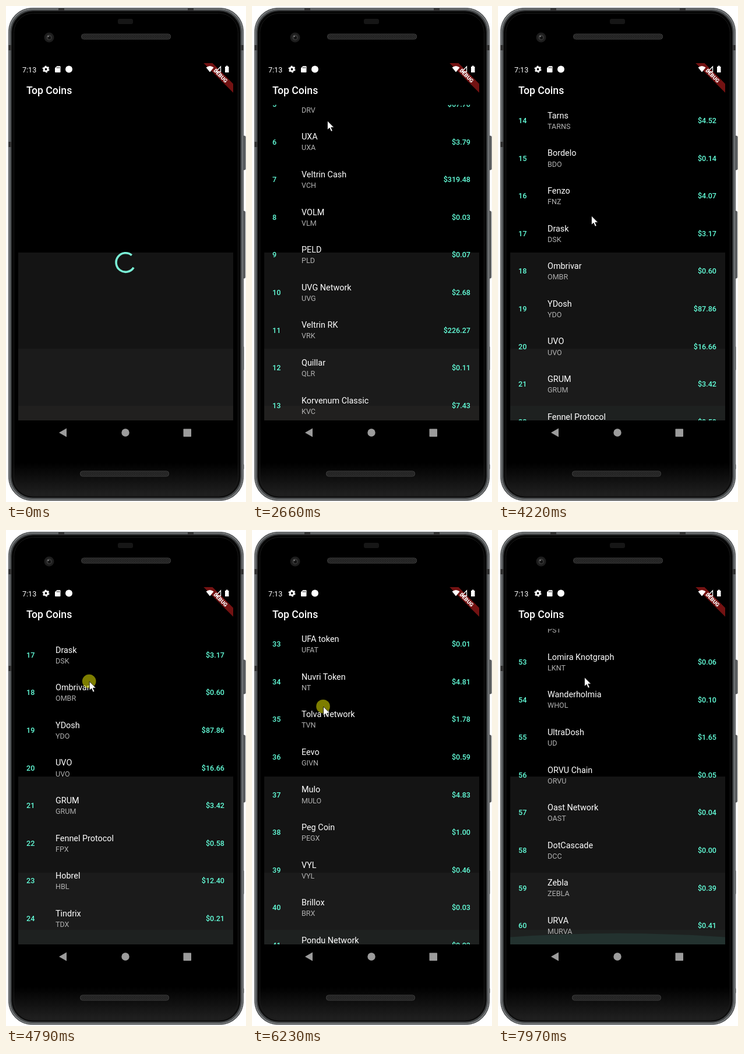
Recreate the animation shown at these times as an HTML page. Size 412 px wide and 851 px high, loop 8 s.

```html
<!DOCTYPE html>
<html lang="en">
<head>
<meta charset="utf-8">
<title>Top Coins</title>
<style>
  html, body { margin: 0; width: 100%; height: 100%; overflow: hidden; background: #fff; }
  svg { display: block; width: 412px; height: 851px; font-family: Roboto, "Liberation Sans", sans-serif; }
  .title { font-size: 14.4px; fill: #fff; }
  .sym { font-size: 12.57px; fill: #b0b0b0; }
  .num { font-size: 12.57px; font-weight: 500; fill: #64ffda; }
  .end { text-anchor: end; }
</style>
</head>
<body>
<svg viewBox="0 0 412 851">
  <defs>
    <clipPath id="listClip"><rect x="21" y="169.5" width="369" height="541.5"/></clipPath>
    <clipPath id="screenClip"><rect x="21" y="98" width="369" height="613"/></clipPath>
    <linearGradient id="chin" x2="0" y2="1">
      <stop offset="0" stop-color="#000"/><stop offset=".93" stop-color="#000"/>
      <stop offset="1" stop-color="#222"/>
    </linearGradient>
    <pattern id="mesh" width="3" height="3" patternUnits="userSpaceOnUse">
      <rect width="3" height="3" fill="#161616"/>
      <path d="M0 0L3 3M3 0L0 3" stroke="#3c3c3c" stroke-width=".7"/>
    </pattern>
  </defs>

  <!-- phone body -->
  <g fill="#5c5f61" stroke="#333" stroke-width=".8">
    <rect x="404" y="223" width="7" height="58" rx="1.5"/>
    <rect x="404" y="352" width="6.500" height="115" rx="1.5"/>
    <rect x="404" y="584" width="4" height="41" rx="1"/>
    <rect x="404" y="786" width="4" height="9" rx="1"/>
  </g>
  <rect x="4.500" y="3.500" width="403" height="845" rx="40" fill="#2e3031" stroke="#55585a"/>
  <rect x="6.250" y="5.250" width="399.500" height="841.500" rx="38.500" fill="none" stroke="#7c7f81" stroke-width="2"/>
  <rect x="8.250" y="7.250" width="395.500" height="837.500" rx="37" fill="none" stroke="#4b4e50" stroke-width="2"/>
  <g fill="#333">
    <rect x="4" y="67" width="6" height="9"/><rect x="402" y="67" width="6" height="9"/>
    <rect x="4" y="233" width="6" height="9"/>
    <rect x="90" y="4" width="10" height="4"/><rect x="312" y="4" width="10" height="4"/>
  </g>
  <rect x="10.500" y="9.500" width="391" height="833" rx="36" fill="url(#chin)" stroke="#0c0c0c" stroke-width="2"/>
  <rect x="13.500" y="12.500" width="385" height="827" rx="33" fill="none" stroke="#1c1c1c"/>
  <rect x="192" y="22" width="26" height="9" rx="3" fill="#161616"/>
  <rect x="129.500" y="48" width="153" height="9" rx="4" fill="url(#mesh)" stroke="#3a3a3a"/>
  <rect x="127.500" y="798" width="152" height="9" rx="4" fill="url(#mesh)" stroke="#3a3a3a"/>
  <circle cx="74" cy="54" r="8.500" fill="#1d1d1d"/>
  <circle cx="74" cy="54" r="5" fill="#333"/>
  <circle cx="74.500" cy="54.500" r="2.500" fill="#111"/>
  <circle cx="72.500" cy="52" r="1.200" fill="#888"/>

  <!-- screen -->
  <rect x="21" y="98" width="369" height="664" fill="#000"/>
  <rect x="21" y="423" width="369" height="165" fill="#141414"/>
  <rect x="21" y="588" width="369" height="98" fill="#1b1b1b"/>
  <rect id="band" x="21" y="686" width="369" height="25" fill="#21201f"/>
  <g clip-path="url(#listClip)">
    <g id="list"></g>
    <path id="glow" fill="#64ffda" fill-opacity=".075"/>
  </g>
  <path id="spinner" fill="none" stroke="#7af0d6" stroke-width="3.600"/>
  <text x="35" y="151" font-size="17.650" font-weight="500" fill="#fff">Top Coins</text>

  <!-- banner and status bar -->
  <g clip-path="url(#screenClip)">
    <g transform="translate(390 98) rotate(45)">
      <rect x="-40" y="25.100" width="80" height="10.800" fill="#731212"/>
      <text y="33.800" font-size="9.160" font-weight="900" fill="#fff" text-anchor="middle">DEBUG</text>
    </g>
  </g>
  <text x="28" y="113.500" font-size="12.570" fill="#fff">7:13</text>
  <g fill="#fff">
    <circle cx="68.500" cy="108.500" r="3.300" fill="none" stroke="#fff" stroke-width="2.800"/>
    <circle cx="68.500" cy="108.500" r="5.100" fill="none" stroke="#fff" stroke-width="1.800" stroke-dasharray="2.900 2.440"/>
    <path d="M87.500 103H92.500Q93.500 103 93.500 104V113Q93.500 114 92.500 114H85Q84 114 84 113V106.500Z"/>
    <path d="M87.500 104.500v2.500M89.500 104.500v2.500M91.500 104.500v2.500" stroke="#000" stroke-width=".8"/>
    <circle cx="108" cy="108.500" r="6"/>
    <path d="M343.500 105.500Q350 100.500 356.500 105.500L350 113.500Z"/>
    <path d="M360 113L368.500 104V113Z" fill="none" stroke="#fff" stroke-width="1.300"/>
    <path d="M376 104H377.800V102.500H380.700V104H382.500V114H376Z"/>
  </g>

  <!-- navigation bar -->
  <g fill="#9c9c9c">
    <path d="M91 732L104 724.500V739.500Z"/>
    <circle cx="205" cy="732" r="6.700"/>
    <rect x="304.500" y="725.500" width="13.500" height="13.500" rx=".8"/>
  </g>

  <g id="pointer">
    <circle id="touch" cy=".5" r="11.800" fill="#ff0" fill-opacity=".49"/>
    <path id="cursor" transform="translate(.5 .8)" d="M0 0V15.500L3.600 12.200L6.200 18.300L8.800 17.200L6.200 11.300H11.200Z" fill="#fff" stroke="#000" stroke-width=".8"/>
  </g>
</svg>
<script>
const COINS = `Veltrin|VLT|11842.30
Korvenum|KVN|392.14
Stabrel|SBR|1.00
QVP|QVP|0.25
Drovacoin|DRV|67.70
UXA|UXA|3.79
Veltrin Cash|VCH|319.48
VOLM|VLM|0.03
PELD|PLD|0.07
UVG Network|UVG|2.68
Veltrin RK|VRK|226.27
Quillar|QLR|0.11
Korvenum Classic|KVC|7.43
Tarns|TARNS|4.52
Bordelo|BDO|0.14
Fenzo|FNZ|4.07
Drask|DSK|3.17
Ombrivar|OMBR|0.60
YDosh|YDO|87.86
UVO|UVO|16.66
GRUM|GRUM|3.42
Fennel Protocol|FPX|0.58
Hobrel|HBL|12.40
Tindrix|TDX|0.21
Palvo|PLV|2.36
Marrowcoin|MRW|71.05
Creel Network|CRLN|0.09
Jostle|JSL|5.12
Ravunde|RVD|0.33
Plain Notice Token|PNT|0.24
9q|QRN|0.56
Brintelovo Chain Token|CVO|0.17
UFA token|UFAT|0.01
Nuvri Token|NT|4.81
Tolva Network|TVN|1.78
Eevo|GIVN|0.59
Mulo|MULO|4.83
Peg Coin|PEGX|1.00
VYL|VYL|0.46
Brillox|BRX|0.03
Pondu Network|PONDU|0.03
Yelt Network|YELT|0.01
Mothcoin|MOTH|0.00
Tavelo|TVO|93.98
Urzy|URB|5.93
Brocadel|BRCD|187.65
Glomeriq|GMQ|6.17
Bevel DAO Token|BVL|4.30
Sundrel|SDL|0.72
Crestovar|CVR|1.14
Wexel Chain|WXL|0.08
Postrel|PST|0.15
Lomira Knotgraph|LKNT|0.06
Wanderholmia|WHOL|0.10
UltraDosh|UD|1.65
ORVU Chain|ORVU|0.05
Oast Network|OAST|0.04
DotCascade|DCC|0.00
Zebla|ZEBLA|0.39
URVA|MURVA|0.41`.split("\n").map(line => line.split("|"));

const LOOP = 8000, LOADED = 570, ROW = 64.6, FIRST = 202, SLOP = 16;
const MAX_SCROLL = COINS.length * ROW - 541.3;
const $ = id => document.getElementById(id);
const clamp = (v, lo = 0, hi = 1) => Math.min(hi, Math.max(lo, v));

// Pointer path: time, x, y
const PATH = [
  [1750, 291, 822], [1900, 186, 396], [2450, 186, 396], [2570, 133, 194],
  [2660, 129, 196], [2800, 134, 225], [3270, 159, 422], [3440, 160, 423],
  [3760, 160, 423], [3900, 145, 255], [3980, 143, 245], [4220, 160, 359],
  [4520, 158, 420], [4700, 156, 420], [4830, 137, 190], [4960, 133, 182],
  [5440, 133, 380], [5800, 122, 377], [6130, 122, 377], [6230, 122, 304],
  [6300, 126, 178], [6420, 130, 172], [6860, 146, 400], [6960, 146, 400],
  [7200, 148, 422], [7330, 148, 423], [7470, 150, 158], [7560, 149, 152],
  [7790, 149, 152], [7970, 148, 252]
];

// Flings: press, release, coast time, coast distance
const FLINGS = [
  [2270, 2570, 710, 310], [3650, 3900, 650, 231], [4640, 4830, 1140, 929],
  [6100, 6300, 560, 380.5], [7280, 7470, 1170, 950]
];

function pointer(t) {
  const i = PATH.findIndex(k => k[0] > t);
  if (i < 1) return (i ? PATH[PATH.length - 1] : PATH[0]).slice(1);
  const [a, b] = [PATH[i - 1], PATH[i]];
  const u = (t - a[0]) / (b[0] - a[0]);
  return [a[1] + (b[1] - a[1]) * u, a[2] + (b[2] - a[2]) * u];
}

const coast = u => ((1.2 * u - 3.27) * u + 3.065) * u;

function scrollAt(t) {
  let pos = 0;
  for (const [press, release, time, dist] of FLINGS) {
    if (t < press) break;
    const y = pointer(Math.min(t, release))[1];
    pos += Math.max(0, pointer(press)[1] - y - SLOP);
    pos += dist * coast(clamp((t - release) / time));
  }
  return Math.min(pos, MAX_SCROLL);
}

function addText(cls, x, y, str) {
  const el = document.createElementNS("http://www.w3.org/2000/svg", "text");
  el.setAttribute("class", cls);
  el.setAttribute("x", x);
  el.setAttribute("y", y);
  el.textContent = str;
  $("list").append(el);
}

COINS.forEach(([name, sym, price], i) => {
  const y = FIRST + i * ROW;
  addText("num", 35, y + 4.5, i + 1);
  addText("title", 85, y - 3.7, name);
  addText("sym", 85, y + 14.4, sym);
  addText("num end", 375, y + 4.5, "$" + price);
});

function drawSpinner(t) {
  const ms = Math.min(t, 230), u = ms / 666;
  const tail = 270 * u * u * (3 - 2 * u), spin = ms * .23;
  const from = 32 + tail + spin, sweep = 278 - tail;
  const at = deg => {
    const a = deg * Math.PI / 180;
    return `${205.3 + 16.3 * Math.cos(a)} ${440 + 16.3 * Math.sin(a)}`;
  };
  $("spinner").setAttribute("d", `M${at(from)}A16.3 16.3 0 ${sweep > 180 ? 1 : 0} 1 ${at(from + sweep)}`);
}

function drawGlow(t) {
  const k = 1.5 * clamp((t - 7700) / 70) - .5 * clamp((t - 7790) / 180);
  const top = 711 - 19 * k, side = 711 - 12.5 * k;
  $("glow").setAttribute("d", k > 0 ? `M21 711V${side}Q205.5 ${2 * top - side} 390 ${side}V711Z` : "");
}

function show(id, on) {
  $(id).style.visibility = on ? "visible" : "hidden";
}

function draw(t) {
  show("spinner", t < LOADED);
  show("list", t >= LOADED);
  show("cursor", t >= PATH[0][0]);
  show("touch", FLINGS.some(f => t >= f[0] && t < f[1]));
  drawSpinner(t);
  drawGlow(t);
  $("pointer").setAttribute("transform", `translate(${pointer(t).join(" ")})`);
  $("list").setAttribute("transform", `translate(0 ${-scrollAt(t)})`);
  $("band").setAttribute("fill", t < 2700 ? "#21201f" : "#1e2120");
}

const start = performance.now();
function tick() {
  draw((performance.now() - start) % LOOP);
  requestAnimationFrame(tick);
}
tick();
</script>
</body>
</html>
```
